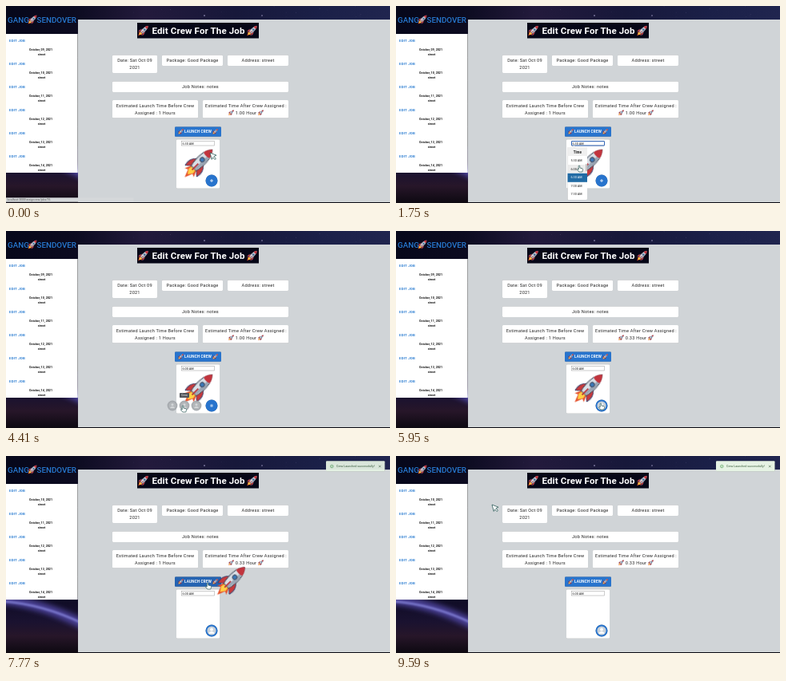
An HTML page that plays this animation: 480x247 px, repeating every 9.66 s.

```html
<!DOCTYPE html>
<html lang="en">
<head>
<meta charset="utf-8">
<title>Edit Crew For The Job</title>
<style>
html, body { margin: 0; width: 100%; height: 100%; overflow: hidden; background: #07070f; }
svg.stage { display: block; width: 100%; height: 100%; }
text { font-family: Roboto, Arial, sans-serif; fill: #222; }
.mid { text-anchor: middle; }
.card { fill: #fff; filter: drop-shadow(0 .5px .7px rgba(0,0,0,.4)); }
.body text { font-size: 5.6px; letter-spacing: .22px; text-anchor: middle; }
.logo { font-size: 9.8px; font-weight: 500; fill: #2779d0; }
.title { font-size: 11.5px; font-weight: 700; letter-spacing: .14px; fill: #fff; }
.edit { font-size: 4.4px; font-weight: 700; fill: #2f7fd2; letter-spacing: .18px; }
.date { font-size: 3.7px; font-weight: 700; fill: #111; text-anchor: middle; }
.input { font-size: 3.8px; }
.white { fill: #fff; }

/* hard switches */
.step { animation: 9.66s step-end infinite; }
.status { animation-name: status; }
.menu { animation-name: menu; }
.hover { animation-name: hover; }
.before { animation-name: before; }
.after { animation-name: after; }
.hours-a { animation-name: hours-a; }
.hours-b { animation-name: hours-b; }
.list { animation-name: list; }
.arrow { animation-name: arrow; }
.hand { animation-name: hand; }
.tip { animation-name: tip; }
.launch { animation-name: launch; }
@keyframes status { 0% { visibility: visible } 5.2%, 100% { visibility: hidden } }
@keyframes menu { 0%, 20.3% { visibility: hidden } 10.1% { visibility: visible } }
@keyframes hover { 0%, 20.3% { visibility: hidden } 15.5% { visibility: visible } }
@keyframes before { 0% { visibility: visible } 20.3%, 100% { visibility: hidden } }
@keyframes after { 0% { visibility: hidden } 20.3%, 100% { visibility: visible } }
@keyframes hours-a { 0% { visibility: visible } 54.9%, 100% { visibility: hidden } }
@keyframes hours-b { 0% { visibility: hidden } 54.9%, 100% { visibility: visible } }
@keyframes list { 0% { transform: none } 79.7%, 100% { transform: translateY(-29px) } }
@keyframes hand { 0%, 24%, 67%, 83%, 100% { visibility: hidden } 14%, 34%, 70% { visibility: visible } }
@keyframes arrow { 0%, 24%, 67%, 83%, 100% { visibility: visible } 14%, 34%, 70% { visibility: hidden } }
@keyframes tip { 0%, 51.8% { visibility: hidden } 44% { visibility: visible } }
@keyframes launch { 0%, 84% { fill: #2874cd } 71.5% { fill: #2463b2 } }

/* smooth motion */
.move { animation: 9.66s ease-in-out infinite; }
.pointer { animation-name: pointer; }
.plus { animation-name: plus; }
.cross { animation-name: cross; }
.face { animation-name: face; }
.action { animation-name: action; }
.toast { animation-name: toast; }
.fly { animation-name: fly; }
@keyframes pointer {
  0%, 4% { transform: translate(255px, 184px) }
  9%, 11% { transform: translate(243px, 171px) }
  16.5%, 20.3% { transform: translate(229px, 200px) }
  30%, 31% { transform: translate(227px, 218px) }
  36%, 39.5% { transform: translate(255px, 217px) }
  44%, 51.8% { transform: translate(221px, 219px) }
  57%, 65% { transform: translate(256px, 216px) }
  72%, 82% { transform: translate(252px, 159px) }
  96%, 100% { transform: translate(120px, 61px) }
}
@keyframes plus {
  0%, 24.6%, 33%, 51.8% { transform: scale(1) }
  26%, 31.5%, 53.5%, 100% { transform: scale(0) }
}
@keyframes cross { 0%, 39.3% { transform: rotate(0) } 41%, 100% { transform: rotate(45deg) } }
@keyframes face { 0%, 53% { transform: scale(0) } 55%, 100% { transform: scale(1) } }
@keyframes action { 0%, 39.5%, 53.3%, 100% { transform: scale(0) } 41.5%, 51.8% { transform: scale(1) } }
@keyframes toast { 0%, 78.7% { opacity: 0 } 80.8%, 100% { opacity: 1 } }
@keyframes fly {
  0% { transform: none }
  76.1% { transform: none; animation-timing-function: cubic-bezier(.333, 0, .667, .333) }
  86.2%, 100% { transform: translate(220px, -220px) }
}
</style>
</head>
<body>
<svg class="stage" viewBox="0 0 480 247">
  <defs>
    <linearGradient id="top">
      <stop offset="0" stop-color="#06071a"/>
      <stop offset=".18" stop-color="#0c0b20"/>
      <stop offset=".36" stop-color="#231a3c"/>
      <stop offset=".6" stop-color="#17183a"/>
      <stop offset=".82" stop-color="#1b2048"/>
      <stop offset="1" stop-color="#20254f"/>
    </linearGradient>
    <linearGradient id="low" x1="0" y1="0" x2="0" y2="1">
      <stop offset="0" stop-color="#0d0b24"/>
      <stop offset=".45" stop-color="#1a1230"/>
      <stop offset=".7" stop-color="#271629"/>
      <stop offset="1" stop-color="#0d0911"/>
    </linearGradient>
    <filter id="soft" x="-20%" y="-80%" width="140%" height="260%"><feGaussianBlur stdDeviation="3"/></filter>
    <filter id="glow" x="-20%" y="-50%" width="140%" height="200%"><feGaussianBlur stdDeviation="1.1"/></filter>
    <clipPath id="side"><rect y="35" width="90" height="174"/></clipPath>
    <clipPath id="space"><rect y="176" width="91" height="71"/></clipPath>
    <g id="rocket" transform="rotate(45)" stroke-linejoin="round">
      <path d="M-4 8L-8 17-4 15 0 25 4 15 8 17 4 8Z" fill="#e5502a"/>
      <path d="M-3 8L-4 14 0 20 4 14 3 8Z" fill="#ffcf45"/>
      <path d="M-5-3C-11 2-12 8-10 14L-3.5 8ZM5-3C11 2 12 8 10 14L3.5 8Z" fill="#c73a3c" stroke="#2b3f6e" stroke-width="1"/>
      <path d="M0-24C6.5-17 7.5-4 4.5 9H-4.5C-7.5-4-6.5-17 0-24Z" fill="#d9dfe6" stroke="#454d5d" stroke-width="1"/>
      <path d="M1.5-20C6-14 6-3 3.5 8H1Z" fill="#9aa6b5"/>
      <path d="M0-24C3.2-20.5 4.8-17.5 5.4-14Q0-11.5-5.4-14C-4.8-17.5-3.2-20.5 0-24Z" fill="#c2343d"/>
      <circle cy="-6" r="2.8" fill="#3a78b8" stroke="#45536b" stroke-width="1.2"/>
      <path d="M-.9 1H.9V12H-.9Z" fill="#b9343b"/>
    </g>
    <g id="person"><circle cy="-1.5" r="1.9"/><path d="M-3.6 3.8C-3.4.2 3.4.2 3.6 3.8Z"/></g>
  </defs>

  <rect width="480" height="247" fill="#07080f"/>
  <rect width="480" height="36" fill="url(#top)"/>
  <g clip-path="url(#space)" fill="none">
    <rect y="176" width="91" height="71" fill="url(#low)"/>
    <path d="M-8 180Q45 184 98 212" stroke="#4a3f94" stroke-width="12" filter="url(#soft)"/>
    <path d="M-8 182Q45 185 98 211" stroke="#8b8be0" stroke-width="2" filter="url(#glow)"/>
  </g>
  <g fill="#b9b4dc"><circle cx="248" cy="12" r=".8"/><circle cx="320" cy="12" r=".7"/></g>
  <g id="stars" fill="#b9b4dc"></g>
  <rect x="90" y="17" width="390" height="229" fill="#d0d4d7"/>

  <text class="logo" x="2" y="20.5">GANG</text>
  <use href="#rocket" transform="translate(33 17) scale(.31)"/>
  <text class="logo" x="38.5" y="20.5">SENDOVER</text>
  <g clip-path="url(#side)"><g class="step list" id="jobs"></g></g>

  <rect x="164" y="21" width="152" height="19.5" fill="#060717"/>
  <use href="#rocket" transform="translate(171.5 31) scale(.36)"/>
  <text class="title mid" x="240.5" y="35">Edit Crew For The Job</text>
  <use href="#rocket" transform="translate(307.5 31) scale(.36)"/>

  <g class="body">
    <rect class="card" x="133" y="61.5" width="56" height="22.5" rx="1"/>
    <text x="161" y="70.1">Date: Sat Oct 09</text>
    <text x="161" y="78.9">2021</text>
    <rect class="card" x="195" y="61.5" width="76" height="13.5" rx="1"/>
    <text x="233" y="70.1">Package: Good Package</text>
    <rect class="card" x="277" y="61.5" width="76" height="13.5" rx="1"/>
    <text x="315" y="70.1">Address: street</text>
    <rect class="card" x="133" y="94.5" width="220" height="13.5" rx="1"/>
    <text x="243" y="103">Job Notes: notes</text>
    <rect class="card" x="133" y="118" width="107" height="22.5" rx="1"/>
    <text x="186.5" y="126.8">Estimated Launch Time Before Crew</text>
    <text x="186.5" y="135.7">Assigned : 1 Hours</text>
    <rect class="card" x="246" y="118" width="107" height="22.5" rx="1"/>
    <text x="300" y="126.8">Estimated Time After Crew Assigned :</text>
    <text class="step hours-a" x="300" y="135.7">1.00 Hour</text>
    <text class="step hours-b" x="300" y="135.7">0.33 Hour</text>
    <use href="#rocket" transform="translate(281.5 133.7) scale(.19)"/>
    <use href="#rocket" transform="translate(318.5 133.7) scale(.19)"/>
  </g>

  <rect class="card" x="213" y="167.3" width="54" height="61.5" rx="1"/>
  <rect x="219.5" y="169.6" width="41" height="5.4" fill="#fff" stroke="#999" stroke-width=".5"/>
  <rect class="step menu" x="219.5" y="169.6" width="41" height="5.4" rx=".5" fill="none" stroke="#2d63b8" stroke-width="1"/>
  <text class="input step before" x="220.5" y="173.7">6:30 AM</text>
  <text class="input step after" x="220.5" y="173.7">6:00 AM</text>

  <rect class="card step launch" x="211" y="151.5" width="58" height="12.2" rx="1.2"/>
  <use href="#rocket" transform="translate(218.5 157.5) scale(.19)"/>
  <text class="mid" x="240" y="159.2" style="font-size:4.7px;font-weight:700;letter-spacing:.12px;fill:#fff">LAUNCH CREW</text>
  <use href="#rocket" transform="translate(261.5 157.5) scale(.19)"/>

  <g class="move fly"><use href="#rocket" transform="translate(241 197)"/></g>

  <g transform="translate(257 219)">
    <g class="move plus">
      <circle class="card" r="7.5" style="fill:#2874cd"/>
      <path class="move cross" d="M-2 0H2M0-2V2" stroke="#fff" stroke-width=".8"/>
    </g>
    <g class="move face">
      <circle class="card" r="7.5" style="fill:#2874cd"/>
      <circle r="5.6" fill="#c8d1da"/>
      <use href="#person" class="white"/>
    </g>
  </g>
  <g id="actions"></g>
  <g class="step tip">
    <rect x="217" y="203" width="12" height="6" rx=".8" fill="#50545a"/>
    <text class="mid" x="223" y="207.2" style="font-size:3.4px;fill:#fff">Crew</text>
  </g>

  <g class="step menu">
    <rect class="card" x="214.5" y="177" width="24.5" height="66" rx="1"/>
    <path d="M214.5 188V178a1 1 0 0 1 1-1H220L222.5 174.8 225 177H238a1 1 0 0 1 1 1V188Z" fill="#f0f0f0"/>
    <text class="mid" x="226.8" y="184.8" style="font-size:4.5px;font-weight:700">Time</text>
    <rect class="step hover" x="214.5" y="199" width="24.5" height="10.6" fill="#ececec"/>
    <rect x="214.5" y="209.8" width="24.5" height="11" fill="#216ba5"/>
    <g id="times"></g>
    <rect x="237" y="198" width="1.6" height="9" fill="#bbb"/>
  </g>

  <g class="move toast">
    <rect class="card" x="400" y="6.3" width="73.5" height="13" rx="1" style="fill:#e6f3e4"/>
    <circle cx="407.3" cy="13" r="1.8" fill="none" stroke="#4c9d51" stroke-width=".6"/>
    <path d="M406.4 13l.7.7 1.4-1.6" fill="none" stroke="#4c9d51" stroke-width=".5"/>
    <text x="413" y="14.2" style="font-size:3.7px;fill:#365a38">Crew Launched successfully!</text>
    <path d="M466 11.7l2.6 2.6m0-2.6l-2.6 2.6" stroke="#456547" stroke-width=".6"/>
  </g>

  <g class="step status">
    <rect y="240.3" width="159.5" height="5.4" fill="#d5d8da"/>
    <text x="1.5" y="244.3" style="font-size:3.4px;fill:#555">localhost:3000/assigncrew/jobs/76</text>
  </g>

  <g class="move pointer" stroke="#2b5b58" stroke-linejoin="round" fill="#fff">
    <path class="step arrow" d="M0 0L8 3.2 4.9 4.6 7.4 7.4 6 8.6 3.6 5.8 2.2 8.4Z" stroke-width=".8"/>
    <path class="step hand" d="M-.8.4Q0-.6.8.4V3L4 3.8Q4.8 4.2 4.5 5.4L3.8 8H-.2L-2.6 5Q-2.2 4-.8 5Z" stroke-width=".7"/>
  </g>
</svg>
<script>
const add = (id, html) => document.getElementById(id).insertAdjacentHTML('beforeend', html);

['09', '10', '11', '12', '13', '14'].forEach((day, i) => {
  const y = 35 + i * 29;
  add('jobs', `<rect y="${y}" width="89.6" height="29.1" fill="#fff"/>
    <text class="edit" x="4" y="${y + 9.6}">EDIT JOB</text>
    <text class="date" x="43.5" y="${y + 20.9}">October, ${day}, 2021</text>
    <text class="date" x="44.5" y="${y + 27}">street</text>`);
});

['5:30', '6:00', '6:30', '7:00', '7:30'].forEach((time, i) => {
  const color = i === 2 ? '#fff' : '#222';
  add('times', `<text class="mid input" x="225.5" y="${194.9 + i * 10.6}" style="fill:${color}">${time} AM</text>`);
});

[208, 223, 238].forEach(x => {
  add('actions', `<g transform="translate(${x} 219)"><g class="move action">
    <circle r="6.4" fill="#a2a6aa" opacity=".92"/>
    <circle r="4.6" fill="#b3b7ba"/><use href="#person" fill="#d3d6d8" transform="scale(.8)"/></g></g>`);
});

let seed = 7;
const rand = () => (seed = seed * 16807 % 2147483647) / 2147483647;
for (let i = 0; i < 16; i++) {
  add('stars', `<circle cx="${rand() * 480}" cy="${rand() * 15}" r="${.2 + rand() * .2}" opacity="${.2 + rand() * .4}"/>`);
}
</script>
</body>
</html>
```
